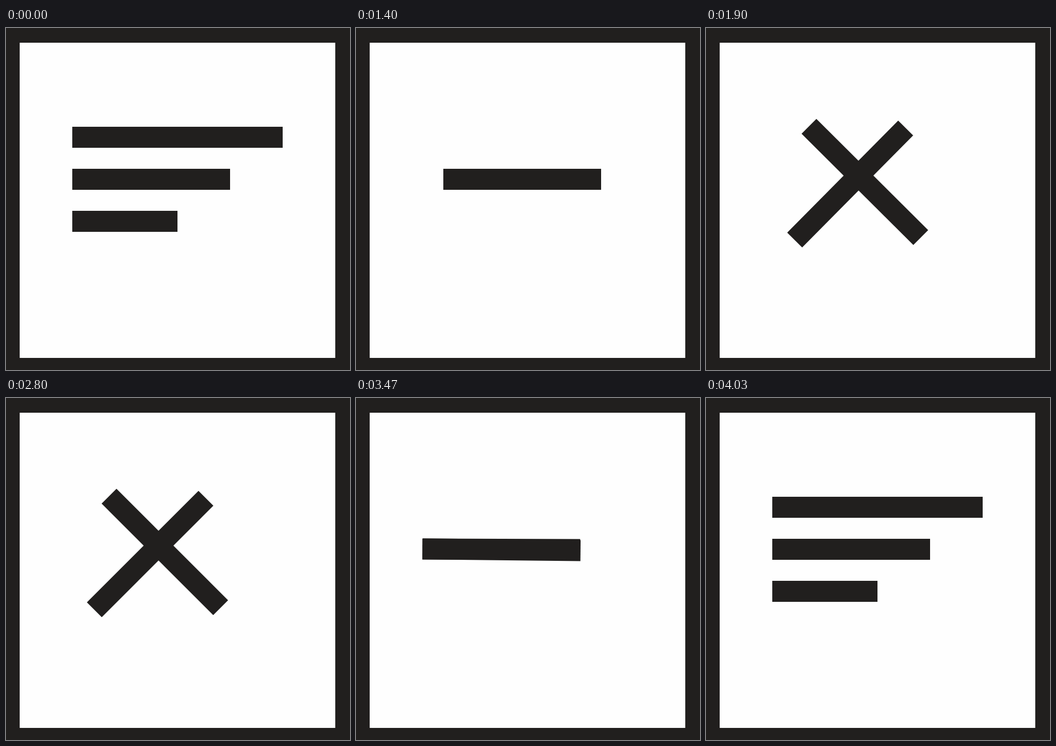
Animation of 654 by 651 pixels, one loop 5430 ms. Source, as an HTML page with a canvas:

```html
<!DOCTYPE html>
<html lang="en">
<head>
<meta charset="utf-8">
<title>Menu icon</title>
<style>
  html, body { margin: 0; width: 100%; height: 100%; overflow: hidden; background: #211f1e; }
  canvas { display: block; }
</style>
</head>
<body>
<canvas width="654" height="651"></canvas>
<script>
const ctx = document.querySelector('canvas').getContext('2d');
const INK = '#211f1e', PAPER = '#fefefe';
const LOOP = 5430, BAR = 40, LENGTH = 300;
const CROSS_START = 1433, UNCROSS_START = 2925, UNCROSS_END = 3525;

// Cubic bezier (.4, 0, .2, 1), solved by bisection
function ease(time, start, duration) {
  const x = Math.min(1, Math.max(0, (time - start) / duration));
  if (x === 0 || x === 1) return x;
  let low = 0, high = 1, s;
  for (let i = 0; i < 24; i++) {
    s = (low + high) / 2;
    const at = 1.2 * s * (1 - s) ** 2 + 0.6 * s * s * (1 - s) + s ** 3;
    if (at < x) low = s; else high = s;
  }
  return s * s * (3 - 2 * s);
}

function flatBars(left, fold) {
  for (const row of [-1, 0, 1]) {
    const y = 268 + row * 80 * (1 - fold);
    const width = LENGTH - row * 100 * (1 - fold);
    ctx.fillRect(Math.round(left), Math.round(y), Math.round(width), BAR);
  }
}

// Moves a bar from `from` to `to` while it turns; `arm` runs from the pivot to its centre
function turningBar(from, to, arm, degrees, p) {
  const full = degrees * Math.PI / 180;
  const swing = a => [
    arm[0] * (Math.cos(a) - 1) - arm[1] * Math.sin(a),
    arm[0] * Math.sin(a) + arm[1] * (Math.cos(a) - 1)
  ];
  const now = swing(full * p), end = swing(full);
  const [x, y] = from.map((v, i) => v + p * (to[i] - v - end[i]) + now[i]);
  ctx.save();
  ctx.translate(x, y);
  ctx.rotate(full * p);
  ctx.fillRect(-LENGTH / 2, -BAR / 2, LENGTH, BAR);
  ctx.restore();
}

function cross(from, armA, armB, p) {
  turningBar(from, [302, 293], armA, 45, p);
  turningBar(from, [274, 297], armB, 135, p);
}

function draw(t) {
  ctx.fillStyle = INK;
  ctx.fillRect(0, 0, 654, 651);
  ctx.fillStyle = PAPER;
  ctx.fillRect(26, 28, 600, 600);
  ctx.fillStyle = INK;

  if (t < CROSS_START) {
    const fold = ease(t, 912, 500);
    flatBars(126 + 40 * fold, fold);
  } else if (t < UNCROSS_START) {
    cross([316, 288], [0, 0], [0, 0], ease(t, CROSS_START, 500));
  } else if (t < UNCROSS_END) {
    cross([276, 288], [-2, -49], [111, 2], 1 - ease(t, UNCROSS_START, 600));
  } else {
    flatBars(126, 1 - ease(t, 3567, 500));
  }
}

const began = performance.now();
function tick() {
  draw((performance.now() - began) % LOOP);
  requestAnimationFrame(tick);
}
tick();
</script>
</body>
</html>
```
